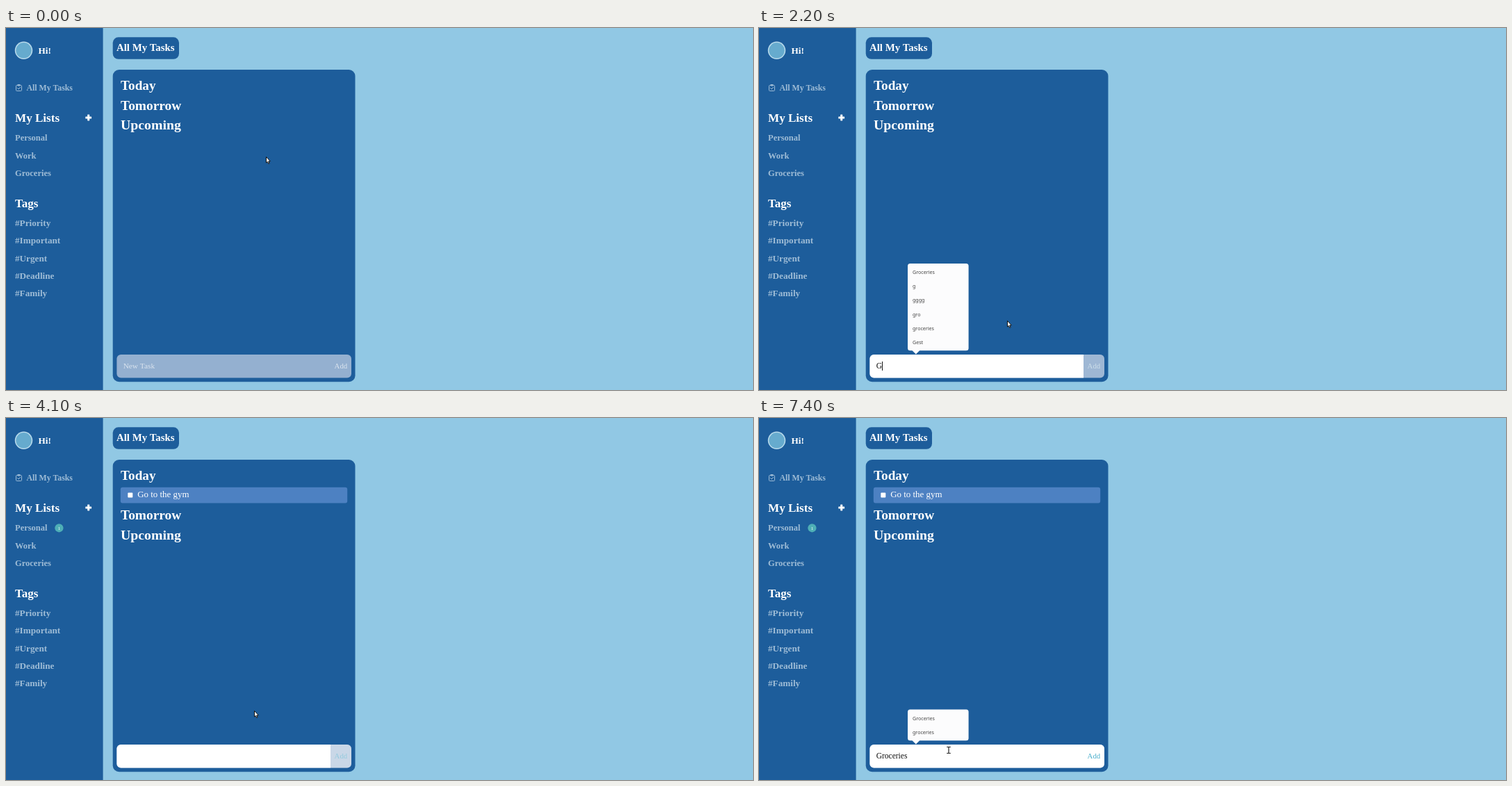
An HTML page with a canvas that plays this animation: 1075x521 px, repeating every 8 s.

```html
<!DOCTYPE html>
<html lang="en">
<head>
<meta charset="utf-8">
<title>Task list</title>
<style>
  html, body { margin: 0; width: 100%; height: 100%; overflow: hidden; background: #91c8e4; }
  canvas { display: block; width: 1075px; height: 521px; }
</style>
</head>
<body>
<canvas id="stage"></canvas>
<script>
const W = 1075, H = 521, LOOP = 8000, STEP = 100;
const NAVY = '#1d5d9b', SKY = '#91c8e4', PALE = '#94b0d0', MUTED = '#9ebcd6', TEAL = '#4eb0cd';
const SERIF = '"Liberation Serif", serif', SANS = '"Noto Sans", sans-serif';
const FOCUS = 1000, SUBMIT = 3900, BLUR = 4100, REFOCUS = 5200, REOPEN = 5500, BLINK = 560;

const canvas = document.getElementById('stage');
const ctx = canvas.getContext('2d');
const ratio = window.devicePixelRatio || 1;
canvas.width = W * ratio;
canvas.height = H * ratio;
ctx.scale(ratio, ratio);

// Earlier entries offered by the autocomplete list.
const history = ['test', 'a', 'test1', 'Groceries', 'tes', 'tset', 'g', 'gggg', 'gro', 'groceries', 'Gest'];

// Each burst of typing spreads its characters evenly over its steps.
const bursts = [
  { from: 2200, to: 2400, text: 'Go ' },
  { from: 2600, to: 2600, text: 'to' },
  { from: 2800, to: 3200, text: ' the g' },
  { from: 3500, to: 3600, text: 'ym' },
  { from: 5900, to: 6000, text: 'Gr' },
  { from: 6300, to: 6500, text: 'oce' },
  { from: 6700, to: 6800, text: 'ries' }
];

const moves = [
  { from: 300, to: 1000, x: 273, y: 478 },
  { from: 1000, to: 1200, x: 357, y: 421 },
  { from: 4800, to: 5200, x: 273, y: 478 }
];

const ramp = (t, from, to) => Math.min(1, Math.max(0, (t - from) / (to - from)));
const smooth = p => p * p * (3 - 2 * p);
const easeOut = p => 1 - (1 - p) ** 2.2;

function typedText(t) {
  return bursts
    .filter(b => b.from <= t && (b.from > SUBMIT || t < SUBMIT))
    .map(b => b.text.slice(0, Math.ceil(b.text.length * ramp(t + STEP, b.from, b.to + STEP))))
    .join('');
}

function caretVisible(t) {
  const focused = t >= FOCUS && t < BLUR || t >= REFOCUS;
  const activity = [FOCUS, REFOCUS, REOPEN, ...bursts.flatMap(b => [b.from, b.to])];
  const last = Math.max(...activity.filter(time => time <= t));
  return focused && Math.floor((t - last) / BLINK) % 2 === 0;
}

function suggestionsFor(t) {
  const open = t >= FOCUS && t < SUBMIT || t >= REOPEN;
  const prefix = typedText(t).toLowerCase();
  return open ? history.filter(word => word.toLowerCase().startsWith(prefix)).slice(0, 6) : [];
}

function pointerAt(t) {
  let x = 374, y = 185;
  for (const move of moves) {
    const p = smooth(ramp(t, move.from, move.to));
    x += (move.x - x) * p;
    y += (move.y - y) * p;
  }
  return [x, y];
}

function box(x, y, w, h, r, fill) {
  ctx.fillStyle = fill;
  ctx.beginPath();
  ctx.roundRect(x, y, w, h, r);
  ctx.fill();
}

function label(text, x, y, size, fill, weight = 'bold', family = SERIF) {
  ctx.font = `${weight} ${size}px ${family}`;
  ctx.fillStyle = fill;
  ctx.fillText(text, x, y);
  return ctx.measureText(text).width;
}

function disc(x, y, r, fill) {
  ctx.fillStyle = fill;
  ctx.beginPath();
  ctx.arc(x, y, r, 0, Math.PI * 2);
  ctx.fill();
}

function polygon(points) {
  ctx.beginPath();
  points.forEach(([x, y]) => ctx.lineTo(x, y));
  ctx.closePath();
}

function drawClipboard() {
  ctx.strokeStyle = MUTED;
  ctx.lineWidth = 1;
  ctx.beginPath();
  ctx.roundRect(14.5, 82.5, 8, 8, 1);
  ctx.moveTo(16.3, 86.3);
  ctx.lineTo(18, 88);
  ctx.lineTo(21, 85);
  ctx.stroke();
  box(16.5, 81, 4, 2.5, 0.5, MUTED);
}

function drawSidebar(hasTask) {
  const pitch = 25.2;
  box(0, 0, 139.6, H, 0, NAVY);
  disc(25.5, 32.3, 12.7, '#b9dbec');
  disc(25.5, 32.3, 11.2, '#66abce');
  label('Hi!', 46.5, 37, 13.2, '#fff');
  drawClipboard();
  label('All My Tasks', 29.5, 90, 11.8, MUTED);

  label('My Lists', 13, 135, 17.1, '#fff');
  box(114.3, 127.5, 8.8, 3, 0.6, '#fff');
  box(117.2, 124.6, 3, 8.8, 0.6, '#fff');
  ['Personal', 'Work', 'Groceries'].forEach((name, i) =>
    label(name, 13, 162.3 + i * pitch, 12.5, MUTED));

  label('Tags', 13, 258, 17, '#fff');
  ['Priority', 'Important', 'Urgent', 'Deadline', 'Family'].forEach((tag, i) =>
    label('#' + tag, 13, 285.2 + i * pitch, 13.2, MUTED));

  if (hasTask) {
    disc(76.4, 158.3, 6.1, '#4eafb6');
    label('1', 74.7, 160.7, 7, '#fff', 'normal');
  }
}

function drawPanel(hasTask) {
  box(153.7, 13.3, 95.3, 31.5, 8, NAVY);
  label('All My Tasks', 159, 33.2, 14.85, '#fff');
  box(153.7, 60, 348.8, 449.2, 9, NAVY);
  const shift = hasTask ? 28.3 : 0;
  label('Today', 165, 89.3, 19.2, '#fff');
  label('Tomorrow', 165, 118 + shift, 19.4, '#fff');
  label('Upcoming', 165, 146.3 + shift, 19.8, '#fff');
  if (hasTask) {
    box(164.8, 99.8, 326.4, 22.6, 3, '#4d81c2');
    box(175.3, 107.4, 7, 7, 1, '#fff');
    label('Go to the gym', 189.3, 114.2, 12.9, '#fff', 'normal');
  }
}

function drawInput(t) {
  const left = 159.4, split = 467, right = 497, top = 470, height = 33.6;
  const text = typedText(t);
  const fieldWhite = easeOut(ramp(t, 950, 1250));
  const buttonWhite = ramp(t, 2190, 2300) - ramp(t, 4000, 4200) + ramp(t, 5890, 6000);
  box(left, top, right - left, height, 6, PALE);
  box(left, top, split - left, height, [6, 0, 0, 6], `rgba(255,255,255,${fieldWhite})`);
  box(split, top, right - split, height, [0, 6, 6, 0], `rgba(255,255,255,${buttonWhite})`);

  if (!text) label('New Task', 168.7, 490.4, 11.3, 'rgba(255,255,255,.65)', 'normal');
  const width = label(text, 168.7, 490.4, 11.5, '#111', 'normal');
  if (caretVisible(t)) box(Math.round(168.5 + width), 480, 1, 13, 0, '#111');

  label('Add', 472.6, 490.4, 10.8, `rgba(255,255,255,${0.65 * (1 - buttonWhite)})`, 'normal');
  ctx.globalAlpha = buttonWhite;
  label('Add', 472.6, 490.4, 10.8, TEAL, 'normal');
  ctx.globalAlpha = 1;
}

function drawSuggestions(words) {
  if (!words.length) return;
  const rowHeight = 20.15, bottom = 464.2;
  const height = words.length * rowHeight + 4.4;
  box(214, bottom - height, 87.6, height, 3.5, '#fcfcfd');
  polygon([[220.3, bottom - 0.3], [231.3, bottom - 0.3], [225.8, 469.5]]);
  ctx.fill();
  words.forEach((word, i) =>
    label(word, 221, 454.8 - (words.length - 1 - i) * rowHeight, 7.1, '#444', 'normal', SANS));
}

function drawArrow() {
  polygon([[0.5, 0.5], [0.5, 9], [2.4, 7.4], [3.7, 10.4], [5.1, 9.8], [3.8, 6.9], [6.3, 6.8]]);
  ctx.fillStyle = '#fff';
  ctx.strokeStyle = '#111';
  ctx.lineWidth = 1;
  ctx.fill();
  ctx.stroke();
}

function drawBeam() {
  for (const [color, width] of [['#fff', 2.4], ['#222', 1.2]]) {
    ctx.strokeStyle = color;
    ctx.lineWidth = width;
    ctx.beginPath();
    ctx.moveTo(0, -4.5);
    ctx.lineTo(0, 4.5);
    for (const y of [-4.5, 4.5]) {
      ctx.moveTo(-2.8, y);
      ctx.lineTo(2.8, y);
    }
    ctx.stroke();
  }
}

function drawPointer(t) {
  const [x, y] = pointerAt(t);
  ctx.save();
  ctx.translate(x, y);
  if (y >= 470) drawBeam();
  else drawArrow();
  ctx.restore();
}

function render(now) {
  const t = Math.floor((now % LOOP) / STEP) * STEP;
  const hasTask = t >= SUBMIT;
  box(0, 0, W, H, 0, SKY);
  drawSidebar(hasTask);
  drawPanel(hasTask);
  drawInput(t);
  drawSuggestions(suggestionsFor(t));
  drawPointer(t);
}

const start = performance.now();
function loop() {
  render(performance.now() - start);
  requestAnimationFrame(loop);
}
loop();
</script>
</body>
</html>
```
